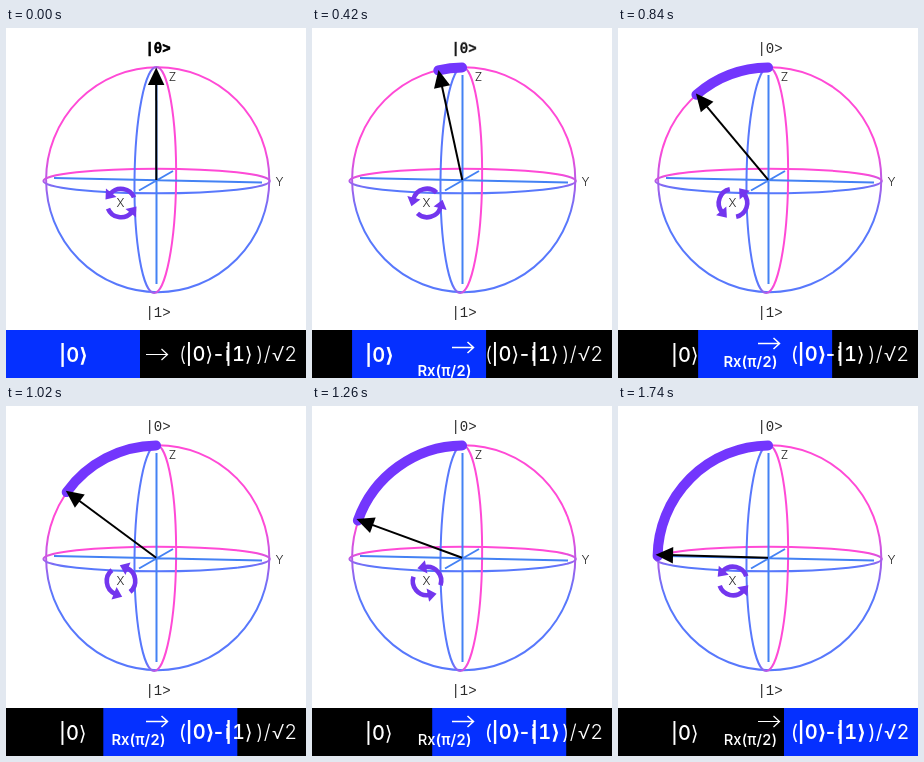
An HTML page that plays this animation: 300x350 px, repeating every 3540 ms.

```html
<!DOCTYPE html>
<html lang="en">
<head>
<meta charset="utf-8">
<title>Qubit rotation</title>
<style>
  html, body { margin: 0; width: 100%; height: 100%; overflow: hidden; background: #fff; }
  svg { display: block; width: 100%; height: 100%; }
  .line { fill: none; stroke-width: 2; }
  .axis { stroke: #4482f4; }
  .mono { font: 14px "Liberation Mono", monospace; fill: #2a2a2a; text-anchor: middle; }
  #state { font-weight: 700; fill: #000; stroke: #000; stroke-width: .5; }
  .name { font: 300 12px Inter, sans-serif; fill: #222; text-anchor: middle; }
  .formula { font: 500 20px Inter, "DejaVu Sans", sans-serif; font-variant-numeric: tabular-nums; fill: #fff; }
  .formula .thin { font-weight: 300; }
  .formula .gate { font-size: 14.8px; text-anchor: middle; }
  .formula path { fill: none; stroke: #fff; stroke-width: 1.2; }
  .strong { font-weight: 600; }
  .strong .thin { font-weight: 400; }
  .strong path { stroke-width: 1.5; }
</style>
</head>
<body>
<svg viewBox="0 0 300 350" preserveAspectRatio="none">
  <defs>
    <linearGradient id="hue">
      <stop offset="0" stop-color="#ff4ad6"/>
      <stop offset=".5" stop-color="#b05ce8"/>
      <stop offset="1" stop-color="#5878fc"/>
    </linearGradient>
    <linearGradient id="rimHue" href="#hue" gradientUnits="userSpaceOnUse" x1="0" x2="0" y1="120" y2="190"/>
    <linearGradient id="beltHue" href="#hue" gradientUnits="userSpaceOnUse" x1="0" x2="0" y1="146" y2="161"/>
    <linearGradient id="hoopHue" href="#hue" gradientUnits="userSpaceOnUse" x1="157" x2="141" y1="0" y2="0"/>
    <clipPath id="window"><rect id="hole" y="302" width="134" height="48"/></clipPath>
  </defs>
  <rect width="300" height="350" fill="#fff"/>

  <g class="line">
    <ellipse cx="151.7" cy="151.7" rx="111.6" ry="112.5" stroke="url(#rimHue)"/>
    <ellipse cx="150.6" cy="153" rx="113.2" ry="12.3" stroke="url(#beltHue)"/>
    <ellipse cx="149.3" cy="152" rx="20.8" ry="113" transform="rotate(.6 149.3 152)" stroke="url(#hoopHue)"/>
    <path class="axis" d="M150.5 47V256M48 150L256 154.5M133 162.5L167 143"/>
  </g>

  <path id="trail" fill="none" stroke="#7336fd" stroke-width="10" stroke-linecap="round"/>
  <g id="arrow">
    <path d="M150.3 152V52" stroke="#000" stroke-width="2"/>
    <path d="M150.3 39.5L158.5 57H142Z"/>
  </g>

  <g id="spin" fill="#7336ee">
    <g id="turn">
      <path d="M128 169.5A14 14 0 0 0 104.5 165.5" fill="none" stroke="#7336ee" stroke-width="4.6"/>
      <path d="M100 160.5L99.5 171.5L110.5 169Z"/>
    </g>
    <use href="#turn" transform="rotate(180 115 175)"/>
  </g>

  <text class="name" x="166.5" y="53">Z</text>
  <text class="name" x="273.5" y="158">Y</text>
  <text class="name" x="114.5" y="179">X</text>
  <text class="mono" x="152" y="24.5">|0&gt;</text>
  <text class="mono" id="state" x="152" y="24.5">|θ&gt;</text>
  <text class="mono" x="152" y="289">|1&gt;</text>

  <rect y="302" width="300" height="48"/>
  <g id="plain" class="formula">
    <text x="53" y="334">|0⟩</text>
    <path class="to" d="M140 0H161.5M155.5 -5.5L161.5 0L155.5 5.5"/>
    <text class="gate" x="132.5">Rx(π/2)</text>
    <text class="thin" x="172.5" y="333">(</text>
    <text x="179.5" y="333">|0⟩</text>
    <text x="206" y="333">-i</text>
    <text x="219" y="333">|1⟩</text>
    <text class="thin" x="250" y="333">)/</text>
    <text class="thin" x="266" y="333">√2</text>
  </g>
  <rect id="band" y="302" width="134" height="48" fill="#0530ff"/>
  <g clip-path="url(#window)"><g id="bold"></g></g>
</svg>
<script>
  const STEP = 60, LAST = 29, LOOP = 3540;
  const $ = id => document.getElementById(id);

  // Heavier copy of the formula, seen only through the blue band
  const copy = $("plain").cloneNode(true);
  copy.removeAttribute("id");
  copy.classList.add("strong");
  $("bold").append(copy);

  const arrows = document.querySelectorAll(".to");
  const gates = document.querySelectorAll(".gate");

  function rim(deg) {
    const a = deg * Math.PI / 180;
    return `${151.6 - 112 * Math.sin(a)} ${151.5 - 112 * Math.cos(a)}`;
  }

  function draw(ms) {
    const step = Math.min(LAST, Math.floor(ms / STEP));
    const angle = 89 * (1 - Math.cos(Math.PI * (step + 0.5) / 31)) / 2;
    const lift = Math.min(1, step / 11);
    const x = 166 * step / LAST;

    $("arrow").setAttribute("transform", `rotate(${-angle} 150 152)`);
    $("spin").setAttribute("transform", `rotate(${-2 * angle} 115 175)`);
    $("trail").setAttribute("d", step ? `M${rim(0.8)}A112 112 0 0 0 ${rim(angle + 0.8)}` : "");
    $("state").setAttribute("opacity", 1 - lift * lift);
    $("band").setAttribute("x", x);
    $("hole").setAttribute("x", x);
    arrows.forEach(el => el.setAttribute("transform", `translate(0 ${326.5 - 11 * lift})`));
    gates.forEach(el => el.setAttribute("y", 365 - 26 * lift));
  }

  const start = performance.now();
  function tick() {
    draw((performance.now() - start) % LOOP);
    requestAnimationFrame(tick);
  }
  draw(0);
  requestAnimationFrame(tick);
</script>
</body>
</html>
```
